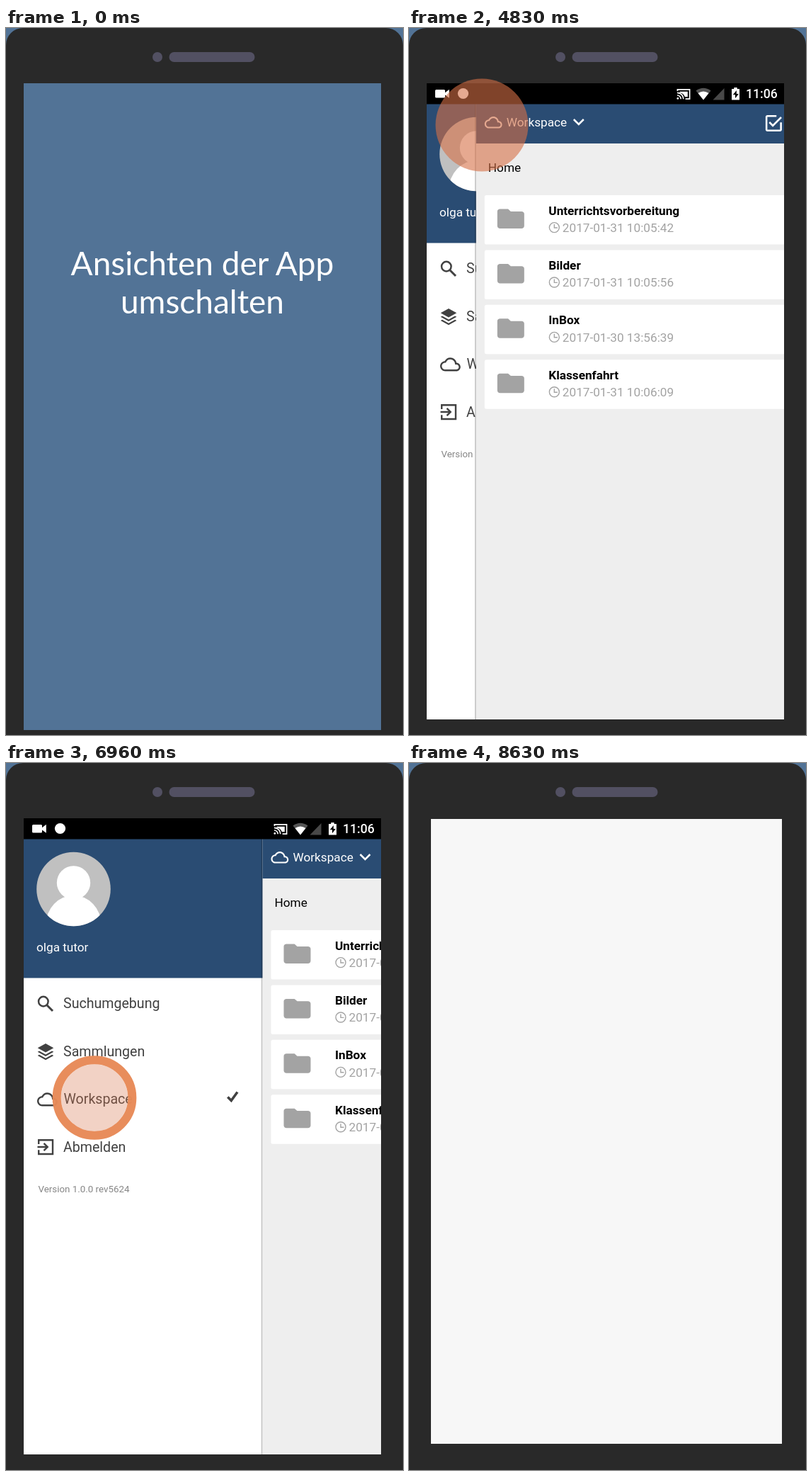
Write an HTML page that moves like this. It is 561 px wide and 998 px high and loops after 8.66 s.

```html
<!DOCTYPE html>
<html lang="de">
<head>
<meta charset="utf-8">
<title>Ansichten umschalten</title>
<style>
  html, body { margin: 0; width: 100%; height: 100%; overflow: hidden; background: #527396; }
  svg { display: block; width: 100%; height: 100%; }
  text { font-family: Roboto, sans-serif; font-size: 17.2px; white-space: pre; }
  .title { font-family: Lato, "Open Sans", sans-serif; font-size: 46px; fill: #fff; text-anchor: middle; }
  .menu text { font-size: 19.6px; fill: #414141; }
  .menu .version { font-size: 13.35px; fill: #868686; }
  .line { fill: none; stroke: currentColor; }
</style>
</head>
<body>
<svg viewBox="0 0 561 998">
  <defs>
    <clipPath id="screen"><rect x="25" y="78" width="505" height="898"/></clipPath>
    <clipPath id="face"><circle cx="95.5" cy="178" r="52.3"/></clipPath>
    <path id="cloud" fill-rule="evenodd" fill="currentColor" d="M19.35 10.04C18.67 6.59 15.64 4 12 4 9.11 4 6.6 5.64 5.35 8.04 2.34 8.36 0 10.91 0 14c0 3.31 2.69 6 6 6h13c2.76 0 5-2.24 5-5 0-2.64-2.05-4.78-4.65-4.96zM19 18H6c-2.21 0-4-1.79-4-4s1.79-4 4-4h.71C7.37 7.69 9.48 6 12 6c3.04 0 5.5 2.46 5.5 5.5v.5H19c1.66 0 3 1.34 3 3s-1.34 3-3 3z"/>
  </defs>

  <path fill="#292929" d="M0 998V24A24 24 0 0 1 24 0H537A24 24 0 0 1 561 24V998z"/>
  <circle cx="214" cy="41" r="7" fill="#525062"/>
  <rect x="230.5" y="34" width="121" height="14" rx="7" fill="#525062"/>

  <g id="intro">
    <rect x="25" y="78" width="505" height="913" fill="#527396"/>
    <text class="title" x="277.5" y="349">Ansichten der App</text>
    <text class="title" x="277.5" y="403">umschalten</text>
  </g>

  <rect id="blank" x="31" y="79" width="496" height="882" fill="#f7f7f7"/>

  <g id="app" clip-path="url(#screen)">
    <g class="menu" color="#414141">
      <rect x="25" y="107" width="505" height="869" fill="#fff"/>
      <rect x="25" y="107" width="505" height="196.5" fill="#2a4c73"/>
      <g clip-path="url(#face)">
        <rect x="43" y="125" width="105" height="106" fill="#c0c0c0"/>
        <circle cx="95.5" cy="169" r="23.7" fill="#fff"/>
        <ellipse cx="95.5" cy="228" rx="39" ry="41" fill="#fff"/>
      </g>
      <text x="43" y="266" style="font-size:17.2px;fill:#fff">olga tutor</text>
      <circle class="line" cx="52.8" cy="336.6" r="6.8" stroke-width="2.5"/>
      <path class="line" d="M57.5 341.5L66 350" stroke-width="3"/>
      <text x="81" y="346">Suchumgebung</text>
      <path fill="currentColor" d="M56 396l11.3 6.3L56 408.6l-11.3-6.3zM47 406.5l9 5 9-5 2.3 1.3L56 414l-11.3-6.2zM47 411.8l9 5 9-5 2.3 1.3L56 419.3l-11.3-6.2z"/>
      <text x="81" y="413.5">Sammlungen</text>
      <use href="#cloud" transform="translate(44 460.5) scale(1.2)"/>
      <text x="81.5" y="481">Workspace</text>
      <path class="line" d="M313.3 471.5l5 5 8.7-12" stroke-width="3.6"/>
      <path class="line" d="M46.2 538v-5.8h19.8v19.8H46.2v-5.8M44.5 542h13.5M53.5 536.8l5.2 5.2-5.2 5.2" stroke-width="2.4"/>
      <text x="81" y="548.5">Abmelden</text>
      <text class="version" x="45.5" y="606">Version 1.0.0 rev5624</text>
    </g>

    <g id="page">
      <rect x="23.3" y="107" width="1.7" height="869" opacity=".25"/>
      <rect x="25" y="107" width="505" height="869" fill="#eee"/>
      <rect x="25" y="107" width="505" height="56" fill="#2a4c73"/>
      <g color="#fff" fill="#fff">
        <use href="#cloud" transform="translate(37 121) scale(1.03)"/>
        <text x="68" y="139.3">Workspace</text>
        <path class="line" d="M163 129l7 7 7-7" stroke-width="2.5"/>
        <path transform="translate(430.2 119.2) scale(1.28)" d="M7.91 10.08L6.5 11.5 11 16 21 6l-1.41-1.41L11 13.17zM19 19H5V5h10V3H5c-1.1 0-2 .9-2 2v14c0 1.1.9 2 2 2h14c1.1 0 2-.9 2-2v-8h-2z"/>
        <path transform="translate(483 120) scale(1.17)" fill-rule="evenodd" d="M19.35 10.04C18.67 6.59 15.64 4 12 4 9.11 4 6.6 5.64 5.35 8.04 2.34 8.36 0 10.91 0 14c0 3.31 2.69 6 6 6h13c2.76 0 5-2.24 5-5 0-2.64-2.05-4.78-4.65-4.96zM14 13v4h-4v-4H7l5-5 5 5z"/>
      </g>
      <text x="42" y="203">Home</text>
      <path d="M489 190.6h20M489 197.6h20M489 204.6h20" fill="none" stroke="#2a4c73" stroke-width="5" stroke-dasharray="5 2.3"/>
      <g id="cards"></g>
    </g>

    <rect x="25" y="78" width="505" height="29.5"/>
    <g fill="#fff" color="#fff">
      <path d="M38.5 87h11q1.5 0 1.5 1.5v2.7l5.8-4.4v12l-5.8-4.4v2.6q0 1.5-1.5 1.5h-11q-1.5 0-1.5-1.5v-8.5q0-1.5 1.5-1.5z"/>
      <circle cx="76.5" cy="92.5" r="7.6"/>
      <path class="line" d="M379.4 89v-2.2h17.2v13.4h-6M379 91.3a9 9 0 0 1 8.8 8.9M379 95a5.2 5.2 0 0 1 5.2 5.2" stroke-width="1.7"/>
      <path d="M382.5 89.8h11.3v7.4h-4q-1.5-5-7.3-6z"/>
      <circle cx="379.8" cy="99.4" r="1.4"/>
      <path fill="#555" d="M405.5 88.5q10.5-7.5 21 0L416 101.5z"/>
      <path d="M408.5 92q7.5-5 15 0L416 101.5z"/>
      <path fill="#484848" d="M445.5 85v16.5H429.5z"/>
      <path d="M459.3 84h4.4v2h3.3v15.5h-11V86h3.3z"/>
      <path fill="#000" d="M462.8 88l-5 6.3h3.2v5l4.8-6.4h-3z"/>
      <text x="476" y="99.4" style="font-size:17.6px;font-weight:500">11:06</text>
    </g>
  </g>

  <g id="tap">
    <circle id="disc" fill="#d67046"/>
    <circle id="ring" fill="none" stroke="#e88a57" opacity=".97"/>
  </g>
</svg>
<script>
const LOOP = 8660, DRAWER = 337.5, TAP_RADIUS = 65.5;
const $ = id => document.getElementById(id);
const set = (el, attrs) => { for (const k in attrs) el.setAttribute(k, attrs[k]); };
const show = (id, on) => set($(id), { display: on ? 'inline' : 'none' });
const clamp = x => Math.max(0, Math.min(1, x));

const folders = [
  ['Unterrichtsvorbereitung', '2017-01-31 10:05:42'],
  ['Bilder', '2017-01-31 10:05:56'],
  ['InBox', '2017-01-30 13:56:39'],
  ['Klassenfahrt', '2017-01-31 10:06:09']
];

$('cards').innerHTML = folders.map(([name, date], i) => `
  <g transform="translate(0 ${236 + i * 77.4})" fill="#a3a3a3">
    <rect x="37" width="480" height="69.5" rx="2.5" fill="#fff"/>
    <path transform="translate(51.2 12.6) scale(1.9 1.72)" d="M10 4H4c-1.1 0-2 .9-2 2v12c0 1.1.9 2 2 2h16c1.1 0 2-.9 2-2V8c0-1.1-.9-2-2-2h-8z"/>
    <text x="127.5" y="27.6" fill="#000" font-weight="700">${name}</text>
    <path color="#a3a3a3" class="line" d="M128.5 45.6a7 7 0 1 1 14 0a7 7 0 1 1-14 0M135.5 41v5h4.5" stroke-width="1.4"/>
    <text x="147" y="52">${date}</text>
    ${[26.3, 34, 41.7].map(y => `<circle cx="485.3" cy="${y}" r="2.8"/>`).join('')}
  </g>`).join('');

// CSS "ease": cubic-bezier(.25, .1, .25, 1)
function ease(x) {
  x = clamp(x);
  const curve = (u, a, b) => 3 * u * (1 - u) ** 2 * a + 3 * u * u * (1 - u) * b + u ** 3;
  let lo = 0, hi = 1;
  for (let i = 0; i < 24; i++) {
    const mid = (lo + hi) / 2;
    if (curve(mid, .25, .25) < x) lo = mid; else hi = mid;
  }
  return curve(hi, .1, 1);
}

// The end of each slide moves in a few separate steps.
const settle = (t, stops) => t < stops[0] ? t : stops.filter(s => s <= t).pop();

function drawTap(t) {
  const second = t >= 6600;
  const age = t - (second ? 6600 : 4290);
  const visible = age >= 0 && age < 930;
  show('tap', visible);
  if (!visible) return;
  const grow = clamp(age / 500);
  const outer = TAP_RADIUS * Math.sin(grow * Math.PI / 2);
  const hole = TAP_RADIUS * grow;
  const center = second ? { cx: 125, cy: 472.5 } : { cx: 103, cy: 137 };
  set($('disc'), { ...center, r: hole, opacity: grow < 1 ? .6 * grow * grow : .6 * clamp((930 - age) / 390) });
  set($('ring'), { ...center, r: (outer + hole) / 2, 'stroke-width': Math.max(0, outer - hole) });
}

function draw(t) {
  show('intro', t < 3640);
  show('app', t >= 3640 && t < 8630);
  show('blank', t >= 8630);
  const opened = ease((settle(t, [5300, 5440, 5540, 5710, 5780]) - 4698) / 830);
  const closed = ease((settle(t, [7570, 7710, 7810]) - 7150) / 480);
  set($('page'), { transform: `translate(${DRAWER * (opened - closed)} 0)` });
  drawTap(t);
}

const start = performance.now();
function tick() {
  draw((performance.now() - start) % LOOP);
  requestAnimationFrame(tick);
}
tick();
</script>
</body>
</html>
```
